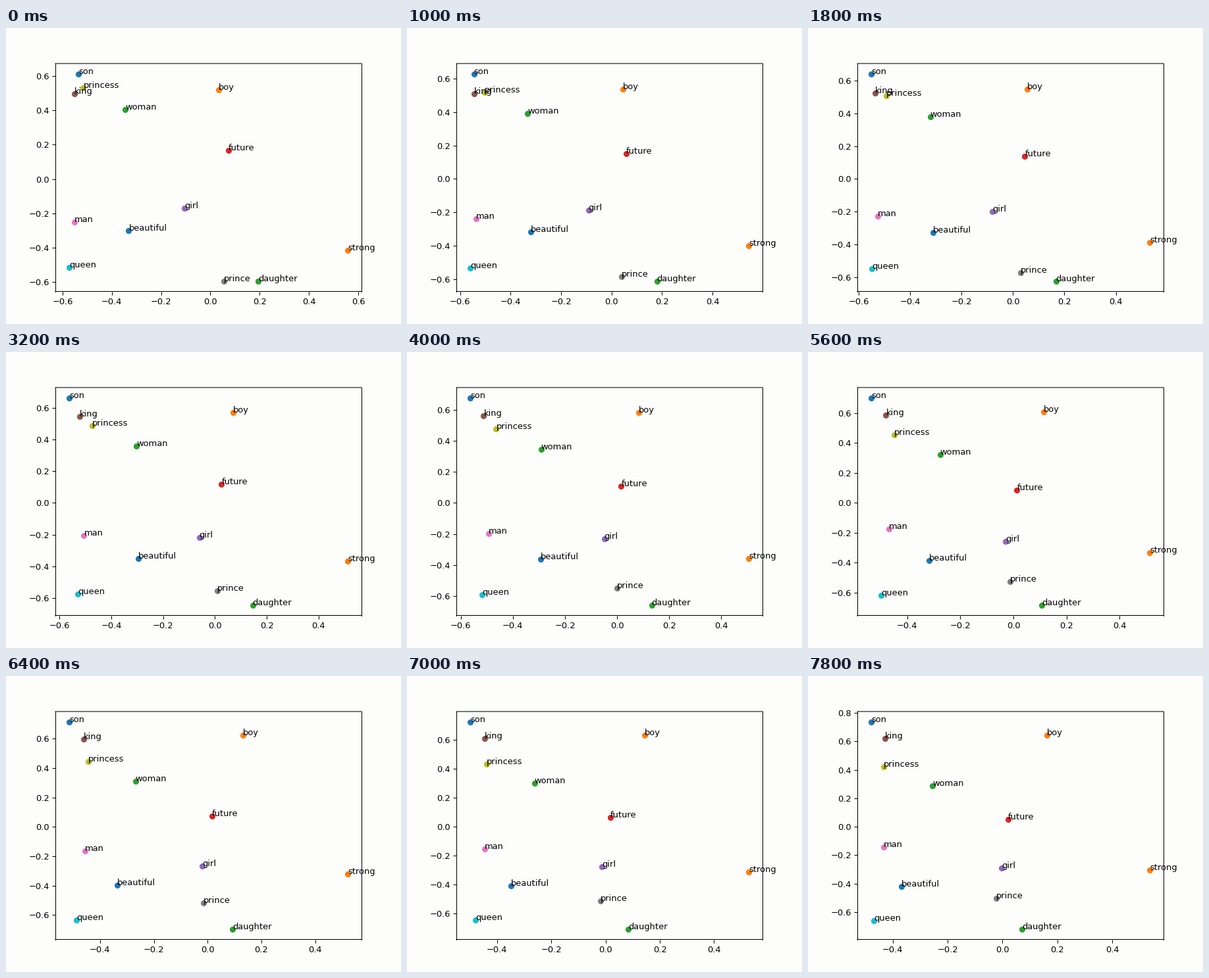
A matplotlib script for the animation above (8000 ms loop, 600 by 450 pixels).

```python
import numpy as np
import matplotlib.pyplot as plt
from matplotlib.animation import FuncAnimation

FRAMES, STEP_MS = 40, 200
PAPER = "#fdfefc"
TURN_AT, SOFTNESS = 21, 2   # step at which sideways drift changes, and how gently

# word: start x, start y, then drift in x and y and turn in x (thousandths per step)
WORDS = {
    "beautiful": (-.3315, -.3005, 2.25, -3.07, -6.9),
    "boy": (.033, .519, 2.35, 3.22, 2.05),
    "daughter": (.195, -.594, -3.1, -3.2, -.2),
    "future": (.0735, .1665, -3.05, -2.95, 3.6),
    "girl": (-.1055, -.170, 2.85, -3.08, -.5),
    "king": (-.553, .494, 1.9, 3.22, 2.85),
    "man": (-.551, -.2508, 2.85, 2.72, .35),
    "prince": (.055, -.594, -2.85, 2.35, 1.85),
    "princess": (-.516, .532, 2.65, -2.8, -1.1),
    "queen": (-.573, -.515, 2.75, -3.73, -.15),
    "son": (-.536, .6115, -1.7, 3.2, 6.9),
    "strong": (.557, -.4146, -2.85, 2.88, 5),
    "woman": (-.346, .404, 2.75, -2.95, -.9),
}

fig, ax = plt.subplots(figsize=(6.4, 4.8), dpi=93.75, facecolor=PAPER)
for side in ("top", "bottom"):
    ax.spines[side].set_snap(False)


def place(step, x, y, dx, dy, turn):
    """Straight drift that bends sideways around TURN_AT."""
    bend = SOFTNESS * np.logaddexp(0, (step - TURN_AT) / SOFTNESS)
    return x + (dx * step + turn * bend) / 1000, y + dy * step / 1000


def draw(step):
    ax.clear()
    ax.set_facecolor(PAPER)
    for word, path in WORDS.items():
        point = place(step, *path)
        ax.scatter(*point)
        ax.annotate(word, point)
    return []


anim = FuncAnimation(fig, draw, frames=FRAMES, interval=STEP_MS, repeat=True,
                     repeat_delay=0, init_func=lambda: draw(0))
plt.show()
```
